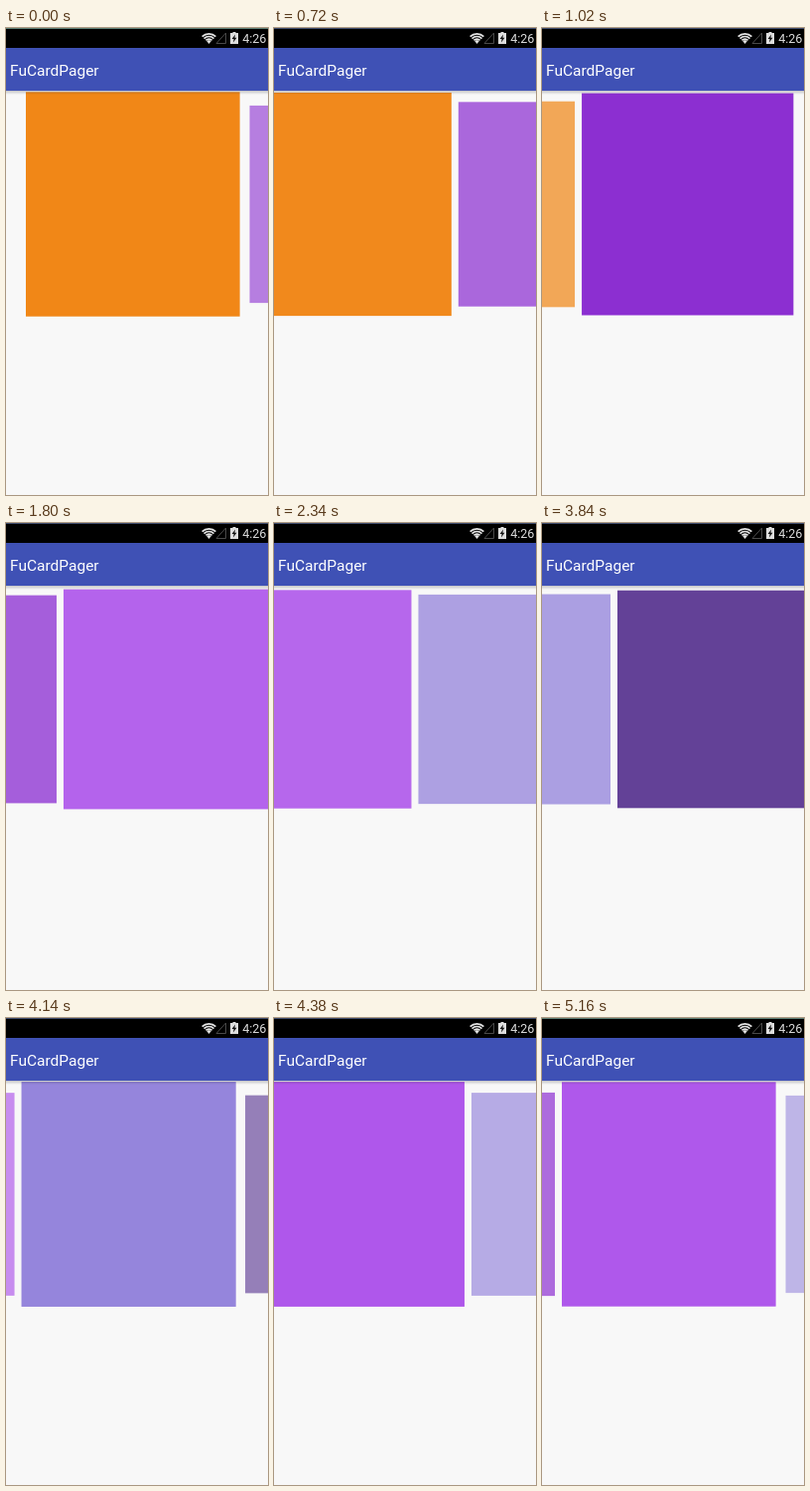
These frames come from a looping animation (264x469 px, 5280 ms). An HTML page with a canvas:

```html
<!DOCTYPE html>
<html lang="en">
<head>
<meta charset="utf-8">
<title>Card pager</title>
<style>
  html, body { margin: 0; width: 100%; height: 100%; overflow: hidden; background: #f8f8f8; }
  canvas { display: block; width: 264px; height: 469px; }
</style>
</head>
<body>
<canvas id="stage" width="264" height="469"></canvas>
<script>
const ctx = document.getElementById('stage').getContext('2d');
const LOOP = 5280, TICK = 60;
const CARD_W = 218.5, CARD_H = 228.4, GAP = 7, PITCH = CARD_W + GAP;
const REST_X = 20, MID_Y = 177;
const colors = ['rgb(241,130,13)', 'rgb(132,31,207)', 'rgb(172,81,235)', 'rgb(146,129,219)', 'rgb(74,35,135)'];

// A lower bend makes the swipe reach its halfway point sooner.
const swipes = [
  { start: 540, end: 1320, from: 0, to: 1, bend: 0.5 },
  { start: 1560, end: 2040, from: 1, to: 2, bend: 0.45 },
  { start: 2220, end: 2580, from: 2, to: 3, bend: 0.56 },
  { start: 3120, end: 3480, from: 3, to: 4, bend: 0.56 },
  { start: 3720, end: 4260, from: 4, to: 3, bend: 0.497 },
  { start: 4260, end: 4620, from: 3, to: 2, bend: 0.255 }
];

function ease(u, bend) {
  const a = u * u, b = (bend * (1 - u)) ** 2;
  return a / (a + b);
}

function pageAt(t) {
  let page = 0;
  for (const s of swipes) {
    if (t < s.start) break;
    const u = Math.min(1, (t - s.start) / (s.end - s.start));
    page = s.from + (s.to - s.from) * ease(u, s.bend);
  }
  return page;
}

function drawCard(i, page) {
  const x = REST_X + (i - page) * PITCH;
  if (x > 264 || x + CARD_W < 0) return;
  const pos = (x + 5) / PITCH, dist = Math.abs(pos);
  const scale = 1 - 0.119 * dist;
  const w = CARD_W * scale, h = CARD_H * scale;
  // Cards shrink toward the edge that faces the centre gap.
  const left = pos < 0 ? x + CARD_W - w : x;
  ctx.globalAlpha = 1 - 0.4 * dist;
  ctx.fillStyle = colors[i];
  ctx.fillRect(left, MID_Y - h / 2, w, h);
  ctx.globalAlpha = 1;
}

function shape(points, color) {
  ctx.beginPath();
  points.forEach(([x, y]) => ctx.lineTo(x, y));
  ctx.closePath();
  ctx.fillStyle = color;
  ctx.fill();
}

function text(str, x, y, size, color) {
  ctx.font = `${size}px Roboto, sans-serif`;
  ctx.fillStyle = color;
  ctx.fillText(str, x, y);
}

function drawWifi() {
  ctx.strokeStyle = '#e4e4e4';
  ctx.lineWidth = 1.7;
  for (const r of [4.3, 7, 9.7]) {
    ctx.beginPath();
    ctx.arc(204.5, 15.5, r, -Math.PI * 0.75, -Math.PI * 0.25);
    ctx.stroke();
  }
  shape([[204.5, 16], [202.2, 13], [204.5, 12], [206.8, 13]], '#e4e4e4');
}

function drawStatus(t) {
  ctx.fillStyle = '#000';
  ctx.fillRect(0, 0, 264, 20);
  ctx.fillStyle = t < 600 || t >= 5160 ? '#5c7d74' : '#3d4a6b';
  ctx.fillRect(0, 0, 264, 1);
  drawWifi();

  ctx.beginPath();
  ctx.moveTo(212, 15.5);
  ctx.lineTo(221.5, 15.5);
  ctx.lineTo(221.5, 5);
  ctx.closePath();
  ctx.strokeStyle = '#4a4a4a';
  ctx.lineWidth = 1;
  ctx.stroke();

  ctx.fillStyle = '#dedede';
  ctx.fillRect(228.5, 4, 3, 1.5);
  ctx.fillRect(226, 5, 8, 11);
  shape([[231, 6.5], [227.6, 11], [229.6, 11], [229, 14.5], [232.4, 9.8], [230.4, 9.8]], '#111');
  text('4:26', 238.2, 15.4, 12.5, '#dcdcdc');
}

function drawHeader() {
  const shade = ctx.createLinearGradient(0, 63, 0, 67);
  shade.addColorStop(0, 'rgba(0,0,0,.2)');
  shade.addColorStop(1, 'rgba(0,0,0,0)');
  ctx.fillStyle = shade;
  ctx.fillRect(0, 63, 264, 4);
  ctx.fillStyle = '#3f51b5';
  ctx.fillRect(0, 20, 264, 43);
  text('FuCardPager', 4, 48, 15.5, '#fff');
}

function draw(now) {
  const t = Math.floor((now % LOOP) / TICK) * TICK;
  const page = pageAt(t);
  ctx.fillStyle = '#f8f8f8';
  ctx.fillRect(0, 0, 264, 469);
  colors.forEach((_, i) => drawCard(i, page));
  drawHeader();
  drawStatus(t);
}

const begin = performance.now();
function loop() {
  draw(performance.now() - begin);
  requestAnimationFrame(loop);
}
loop();
</script>
</body>
</html>
```
